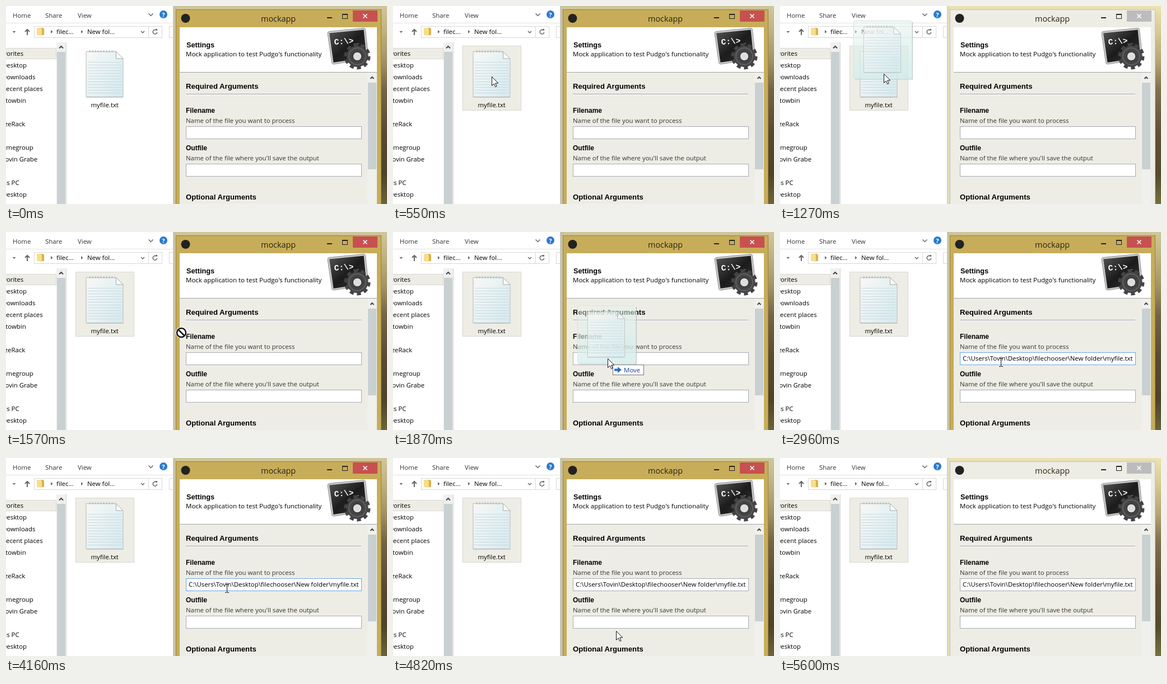
Write an HTML page that moves like this. It is 680 px wide and 354 px high and loops after 5.8 s.

```html
<!DOCTYPE html>
<html lang="en">
<head>
<meta charset="utf-8">
<title>Drag a file into a form</title>
<style>
html, body { margin: 0; width: 100%; height: 100%; overflow: hidden; background: #fff; }
svg { display: block; width: 680px; height: 354px; }
text { font: 11.4px 'Open Sans', 'Noto Sans', sans-serif; fill: #000; white-space: pre; }
.head { font: bold 13.15px 'Liberation Sans', Arial, sans-serif; }
.label { font: bold 12px 'Liberation Sans', Arial, sans-serif; }
.hint, .tab { fill: #333; }
.title { font-size: 14.4px; fill: #2b2410; }
.prompt { font: bold 14.5px 'Liberation Mono', monospace; fill: #fff; }
.field { fill: #fff; stroke: #a6abb3; }
.crisp { shape-rendering: crispEdges; }

.anim { animation: 5.8s step-end infinite; }
.frame { animation-name: frame; }
.close { animation-name: close; }
.shade { animation-name: shade; }
.hover { animation-name: hover; }
.pointer { animation-name: move; }
.arrow { animation-name: arrow; }
.ghost { animation-name: ghost; }
.tip { animation-name: tip; }
.ban { animation-name: ban; }
.beam { animation-name: beam; }
.path { animation-name: path; }
.name { animation-name: name; }
.out { animation-name: out; }

@keyframes frame {
  0%, 27.06% { fill: #c7ad5a; stroke: #9c843a; }
  15.17%, 96.55%, 100% { fill: #eeede5; stroke: #c4c2b8; }
}
@keyframes close {
  0%, 27.06% { fill: #c75050; }
  15.17%, 96.55%, 100% { fill: #bcbcbc; }
}
@keyframes shade {
  0%, 27.06% { opacity: .14; }
  16.2%, 96.55%, 100% { opacity: 0; }
}
@keyframes hover {
  0% { opacity: 0; }
  7.41%, 100% { opacity: 1; }
}
@keyframes move {
  0%, 2.24% { transform: translate(-4px, 22px); }
  2.24% { animation-timing-function: steps(7); }
  9.48% { transform: translate(176px, 126px); }
  21.89% { transform: translate(185px, 121px); animation-timing-function: steps(5); }
  27.06% { transform: translate(313px, 180px); animation-timing-function: steps(4); }
  31.2% { transform: translate(373px, 218px); }
  32.24% { transform: translate(383px, 226px); }
  33.27% { transform: translate(389px, 231px); }
  34.31% { transform: translate(392px, 233px); }
  41.2% { transform: translate(394px, 233px); }
  71.72% { transform: translate(394px, 233px); animation-timing-function: steps(5); }
  76.89%, 100% { transform: translate(398px, 309px); }
}
@keyframes arrow {
  0%, 27.06%, 48.96%, 75.86%, 96.55%, 100% { opacity: 0; }
  2.24%, 31.2%, 72.75%, 76.89% { opacity: 1; }
}
@keyframes ghost {
  0%, 27.06%, 46.89%, 100% { opacity: 0; }
  21.89%, 31.2% { opacity: 1; }
}
@keyframes tip {
  0%, 46.89%, 100% { opacity: 0; }
  31.2% { opacity: 1; }
}
@keyframes ban {
  0%, 31.2%, 100% { opacity: 0; }
  27.06% { opacity: 1; }
}
@keyframes beam {
  0%, 72.75%, 76.89%, 100% { opacity: 0; }
  48.96%, 75.86% { opacity: 1; }
}
@keyframes path {
  0% { opacity: 0; }
  46.89%, 100% { opacity: 1; }
}
@keyframes name {
  0%, 83.1%, 100% { stroke: #a6abb3; }
  47.93%, 81.03% { stroke: #8bacd0; }
  51.03% { stroke: #66a7e8; }
}
@keyframes out {
  0%, 83.1%, 100% { stroke: #a6abb3; }
  75.86% { stroke: #66a7e8; }
  81.03% { stroke: #8bacd0; }
}
</style>
</head>
<body>
<svg viewBox="0 0 680 354">
  <defs>
    <linearGradient id="scene" x2="0" y2="1">
      <stop offset="0" stop-color="#ebe2b4"/>
      <stop offset=".12" stop-color="#d9cc94"/>
      <stop offset=".28" stop-color="#b5a573"/>
      <stop offset=".42" stop-color="#80704e"/>
      <stop offset=".65" stop-color="#5f5036"/>
      <stop offset=".85" stop-color="#544a2e"/>
      <stop offset="1" stop-color="#75703f"/>
    </linearGradient>
    <linearGradient id="paper" x2="1" y2=".7">
      <stop offset="0" stop-color="#f8f8f5"/>
      <stop offset=".5" stop-color="#e9f2f3"/>
      <stop offset="1" stop-color="#d9ebef"/>
    </linearGradient>
    <linearGradient id="glass" x2=".3" y2="1">
      <stop offset="0" stop-color="#e8f3ec" stop-opacity=".45"/>
      <stop offset="1" stop-color="#d3ecec" stop-opacity=".78"/>
    </linearGradient>
    <linearGradient id="screen" x2="1" y2="1">
      <stop offset="0" stop-color="#555"/>
      <stop offset=".5" stop-color="#1c1c1c"/>
      <stop offset="1" stop-color="#333"/>
    </linearGradient>
    <pattern id="rules" width="66" height="5" patternUnits="userSpaceOnUse">
      <path d="M0 2.5H66" stroke="#c6dbe2"/>
    </pattern>
    <g id="note">
      <path d="M.5 3.5H54L66.5 16V84.5H.5Z" fill="url(#paper)" stroke="#b4babb"/>
      <path d="M3 18H64V82H3Z" fill="url(#rules)"/>
      <path d="M54 3.5V16H66.5Z" fill="#fafafa" stroke="#a4aaab"/>
      <path d="M6 3H52" stroke="#bcc2c3" stroke-width="4" stroke-dasharray="2 3"/>
      <path d="M1 85.5H67" stroke="#b9bcbb" opacity=".6"/>
    </g>
  </defs>

  <!-- desktop -->
  <rect width="680" height="354" fill="url(#scene)"/>
  <rect x="299" width="4" height="354" fill="#e3dcba"/>
  <path class="anim shade" d="M298 0H680V354H298Z" fill="#2a2010"/>

  <!-- file manager -->
  <rect width="299" height="354" fill="#fff"/>
  <path class="crisp" d="M298.5 0V354" stroke="#c8c8c4"/>
  <text class="tab" x="12" y="21">Home</text>
  <text class="tab" x="70" y="21">Share</text>
  <text class="tab" x="128" y="21">View</text>
  <path d="M0 30.5H298" stroke="#e2e2e0" class="crisp"/>
  <g fill="none" stroke="#666" stroke-width="1.5">
    <path d="M254.500 13.500L258.500 17.500L262.500 13.500"/>
    <path d="M241 45L244 48L247 45"/>
    <path d="M34 46L38 42L42 46M38 42V52" stroke-width="2"/>
    <path d="M268.500 43.500A3.800 3.800 0 1 0 269.700 47"/>
  </g>
  <path d="M11.500 45H17.500L14.500 48ZM266.500 41H270V44.500ZM80 43L83.500 46L80 49ZM134 43L137.500 46L134 49Z" fill="#666"/>
  <circle cx="281" cy="15" r="7" fill="#2b79cb"/>
  <text x="281" y="19.500" text-anchor="middle" style="font-weight:bold;fill:#fff">?</text>
  <path class="crisp" d="M298 36.500H291.500V56.500H298M50.500 36.500H278.500V56.500H50.500ZM254.500 36V57" fill="none" stroke="#d7d7d5"/>
  <path d="M61 39H66L68 41V52H60Z" fill="#d9b04c"/>
  <path d="M55 39H62L64 41V53L55 52Z" fill="#f6de8c"/>
  <text x="90" y="50">filec...</text>
  <text x="145" y="50">New fol...</text>

  <rect class="crisp" x="-1.500" y="75.500" width="91" height="19" fill="#eeede5" stroke="#d6d6d2"/>
  <text x="-17" y="89">Favorites</text>
  <text x="-7" y="110">Desktop</text>
  <text x="-7" y="131">Downloads</text>
  <text x="-7" y="152">Recent places</text>
  <text x="-7" y="173">Stowbin</text>
  <text x="-17" y="215">HazeRack</text>
  <text x="-15" y="257">Homegroup</text>
  <text x="-7" y="278">Tovin Grabe</text>
  <text x="-15" y="320">This PC</text>
  <text x="-7" y="341">Desktop</text>
  <g class="crisp">
    <rect x="90" y="65" width="17" height="289" fill="#f0f0ee"/>
    <rect x="91" y="82" width="15" height="272" fill="#c8d0d2"/>
    <path d="M107.500 65V354" stroke="#d2d2ce"/>
  </g>
  <path d="M95 75.500L98.500 72L102 75.500" fill="none" stroke="#444" stroke-width="2"/>

  <rect class="anim hover crisp" x="124.500" y="71.500" width="104" height="115" fill="#eeede5" stroke="#d6d6d2"/>
  <use href="#note" x="142.500" y="78"/>
  <text x="151.500" y="181">myfile.txt</text>

  <!-- form window -->
  <rect class="anim frame crisp" x="303.500" y="6.500" width="366" height="360"/>
  <circle cx="320.500" cy="22" r="8" fill="#222"/>
  <text class="title" x="455" y="28">mockapp</text>
  <path class="crisp" d="M573 20H582V22H573Z" fill="#222"/>
  <path class="crisp" d="M600.500 14.500H609.500V22.500H600.500ZM600 15.500H610" fill="none" stroke="#222"/>
  <rect class="anim close crisp" x="619" y="8" width="44" height="20"/>
  <path d="M637.500 14.500L644.500 21.500M644.500 14.500L637.500 21.500" stroke="#fff" stroke-width="1.700"/>

  <g class="crisp">
    <rect x="310" y="38" width="352" height="316" fill="#eeede5"/>
    <rect x="310" y="38" width="352" height="80" fill="#fff"/>
    <path d="M310 118.500H662M321 157.500H634" stroke="#a0a3a6"/>
    <path d="M321 158.500H634" stroke="#fff"/>
    <rect x="645" y="119" width="17" height="235" fill="#f0f0ec"/>
    <rect x="646" y="137" width="15" height="155" fill="#c8d0d2"/>
  </g>
  <path d="M650.500 130L653.500 127L656.500 130" fill="none" stroke="#444" stroke-width="2"/>
  <text class="label" x="322" y="74" style="font-size:12.700px">Settings</text>
  <text x="321" y="90" style="font-size:11.500px">Mock application to test Pudgo's functionality</text>

  <path d="M574 49Q574 46 577 45.500L638 39.500Q641 39.500 641.500 42L647 94L585 104Q582 104 581.500 101Z" fill="#c9c9c9" stroke="#909090"/>
  <path d="M577 48.500L638.500 42.500L643.500 92L584.500 101Z" fill="url(#screen)"/>
  <text class="prompt" transform="translate(586 69) rotate(-4)">C:\&gt;_</text>
  <g fill="none" stroke="#444446">
    <circle cx="627" cy="90" r="20" stroke-width="7" pathLength="20" stroke-dasharray="1.100 .900"/>
    <circle cx="627" cy="90" r="13.500" stroke-width="11"/>
    <circle cx="627" cy="90" r="15" stroke="#606063" stroke-width="2"/>
    <circle cx="627" cy="90" r="8" stroke="#333" stroke-width="1.500" fill="#dededc"/>
  </g>

  <text class="head" x="321" y="148">Required Arguments</text>
  <text class="label" x="321" y="191">Filename</text>
  <text class="hint" x="321" y="209">Name of the file you want to process</text>
  <rect class="field anim name crisp" x="321.500" y="215.500" width="313" height="22"/>
  <text class="anim path" x="326" y="230">C:\Users\Tovin\Desktop\filechooser\New folder\myfile.txt</text>
  <text class="label" x="321" y="258">Outfile</text>
  <text class="hint" x="321" y="276">Name of the file where you'll save the output</text>
  <rect class="field anim out crisp" x="321.500" y="282.500" width="313" height="22"/>
  <text class="head" x="321" y="346">Optional Arguments</text>

  <!-- pointer and what it carries -->
  <g class="anim pointer">
    <g class="anim ghost">
      <path d="M51 -92V9.500H-51" fill="none" stroke="#5a6a6a" stroke-width="2" opacity=".35"/>
      <rect x="-53.500" y="-94.500" width="104" height="104" rx="3" fill="url(#glass)" stroke="#d3e4e2"/>
      <use href="#note" x="-36" y="-87" opacity=".7"/>
    </g>
    <g class="anim tip">
      <rect class="crisp" x="9.500" y="11.500" width="55" height="18" fill="#fff" stroke="#777"/>
      <path d="M12 18.500H18V15L25 20.500L18 26V22.500H12Z" fill="#2a6fc4"/>
      <text x="29" y="24.500" style="font-size:11.500px;fill:#1c3f9e">Move</text>
    </g>
    <path class="anim arrow" d="M.5 .5V16.500L4.200 13L6.700 18.500L9.200 17.500L6.700 12H11.800Z" fill="#fff" stroke="#111"/>
    <g class="anim ban" fill="none">
      <circle r="8.200" fill="#fff" stroke="#fff" stroke-width="4"/>
      <circle r="8" stroke="#111" stroke-width="2.500"/>
      <path d="M-5.500 -5.500L5.500 5.500" stroke="#111" stroke-width="2.500"/>
    </g>
    <path class="anim beam crisp" d="M-3 -7.500H0M1 -7.500H4M.5 -7V7M-3 7.500H0M1 7.500H4" fill="none" stroke="#111"/>
  </g>
</svg>
</body>
</html>
```
